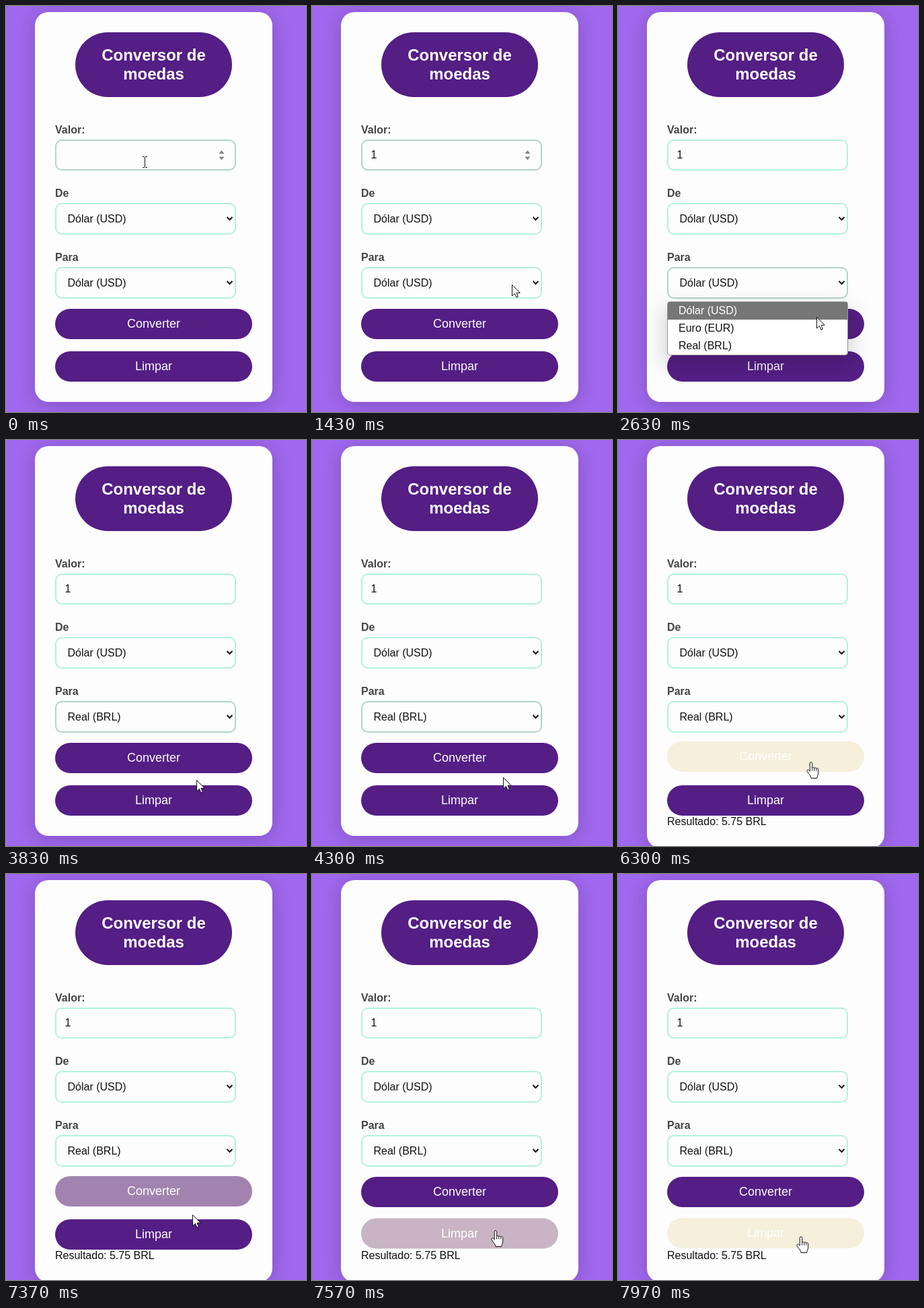
Write an HTML page that moves like this. It is 446 px wide and 602 px high and loops after 8000 ms.

```html
<!DOCTYPE html>
<html lang="pt-BR">
<head>
<meta charset="utf-8">
<title>Conversor de moedas</title>
<style>
  html, body { margin: 0; width: 100%; height: 100%; overflow: hidden; }
  body { position: relative; background: #a068ee; }
  #card {
    position: absolute; left: 43px; top: 9px; width: 353px; height: 578px;
    border-radius: 20px; background: #fdfdfd;
    box-shadow: 0 4px 30px rgba(0, 0, 0, .2);
  }
  svg { position: absolute; left: 0; top: 0; }
  text { font: 16px "Liberation Sans", Arial, sans-serif; fill: #111; white-space: pre; }
  .title { font-size: 24px; font-weight: bold; fill: #fff; text-anchor: middle; }
  .label { font-weight: bold; fill: #444; }
  .button text { font-size: 18px; fill: #fff; text-anchor: middle; }
  .plum { fill: #541e85; }
  .field { fill: #fdfdfd; stroke: #b3f1de; stroke-width: 2; }
  .field.focus { stroke: #b2d3cd; }
  .chevron { fill: none; stroke: #111; stroke-width: 2; }
  #glow { fill: #d6d6d6; filter: blur(14px); mix-blend-mode: multiply; }
  .pointer { fill: #fff; stroke: #111; stroke-linejoin: round; }
</style>
</head>
<body>
<div id="card"></div>
<svg width="446" height="602" viewBox="0 0 446 602">
  <rect class="plum" x="103" y="39" width="233" height="96" rx="48"/>
  <text class="title" x="219.5" y="81">Conversor de</text>
  <text class="title" x="219.5" y="109">moedas</text>

  <text class="label" x="73" y="189">Valor:</text>
  <rect class="field" id="amountBox" x="74" y="199" width="267" height="44" rx="9"/>
  <text id="amount" x="87.5" y="226">1</text>
  <path id="spinner" fill="#858585" d="M316.5 219l4-5 4 5zM316.5 223.5l4 5 4-5z"/>

  <text class="label" x="73" y="283">De</text>
  <rect class="field" x="74" y="293" width="267" height="45" rx="9"/>
  <text x="91.5" y="321">Dólar (USD)</text>
  <path class="chevron" d="M328.5 313l4 4 4-4"/>

  <text class="label" x="73" y="378">Para</text>
  <rect class="field" id="targetBox" x="74" y="388" width="267" height="45" rx="9"/>
  <text id="target" x="91.5" y="416">Dólar (USD)</text>
  <path class="chevron" d="M328.5 408l4 4 4-4"/>

  <text id="result" x="73" y="571">Resultado: 5.75 BRL</text>
  <g class="button" id="convert">
    <rect class="plum" x="73" y="449" width="293" height="45" rx="22.5"/>
    <text x="219.5" y="477">Converter</text>
  </g>
  <g class="button" id="clear">
    <rect class="plum" x="73" y="512" width="293" height="45" rx="22.5"/>
    <text x="219.5" y="540">Limpar</text>
  </g>

  <rect id="glow" x="68" y="446" width="279" height="86" rx="6"/>
  <g id="popup">
    <rect x="73.5" y="438.5" width="268" height="79" rx="4" fill="#fff" stroke="#999"/>
    <rect id="highlight" x="74" y="439" width="267" height="26" fill="#767676"/>
    <text x="90" y="457">Dólar (USD)</text>
    <text x="90" y="483">Euro (EUR)</text>
    <text x="90" y="509">Real (BRL)</text>
  </g>

  <g id="cursor">
    <path id="beam" fill="none" stroke="#111" d="M-3 -7.5h2.5l1 1 1-1H4M.5 -7V8M-3 8.5h2.5l1-1 1 1H4"/>
    <path id="arrow" class="pointer" d="M.5 .5V17L4.4 13.3 7 19 9.4 18 7 12.3H12.2Z"/>
    <path id="hand" class="pointer" d="M-1.7 13V1.5a1.7 1.7 0 0 1 3.4 0V8.5a1.6 1.6 0 0 1 3.1 .4 1.6 1.6 0 0 1 3.1 .6 1.5 1.5 0 0 1 2.8 1V16c0 3-1.9 4-1.9 7.5H0C0 20-3 18-5.8 13.5-7 11.5-4.6 10-3.2 11.6ZM1.7 8.5V12.5M4.8 9V12.5M7.9 9.5V12.5"/>
  </g>
</svg>
<script>
const LOOP = 8000;
const TIMES = { typed: 500, open: 1950, close: 3600, clicked: 4800, result: 6250 };
const HOVER_MS = 300;

// time, x, y of the pointer hotspot
const PATH = [
  [0, 206, 231], [850, 206, 231], [1350, 297, 413], [2100, 297, 413],
  [2500, 295, 461], [2750, 295, 461], [3250, 283, 504], [4250, 283, 504],
  [4600, 287, 478], [7180, 287, 478], [7370, 277, 505],
  [7650, 272, 538], [LOOP, 272, 538]
];
const FILL = [[84, 30, 133], [245, 239, 220]];

const $ = id => document.getElementById(id);
const clamp = v => Math.min(1, Math.max(0, v));
const lerp = (a, b, k) => a + (b - a) * k;
const easeOut = v => 1 - (1 - v) ** 2;
const show = (id, on) => $(id).setAttribute('visibility', on ? 'visible' : 'hidden');

function pointerAt(t) {
  const i = PATH.findIndex(p => p[0] > t);
  const [a, b] = [PATH[i - 1], PATH[i]];
  const k = (t - a[0]) / (b[0] - a[0]);
  return [lerp(a[1], b[1], k), lerp(a[2], b[2], k)];
}

function hover(t, enter, leave = Infinity) {
  return easeOut(clamp((t - enter) / HOVER_MS)) - easeOut(clamp((t - leave) / HOVER_MS));
}

function paintButton(id, k) {
  $(id).setAttribute('transform', `translate(0 ${-2 * k})`);
  $(id).firstElementChild.style.fill = `rgb(${FILL[0].map((c, n) => lerp(c, FILL[1][n], k))})`;
}

function draw(t) {
  const [x, y] = pointerAt(t);
  const open = t >= TIMES.open && t < TIMES.close;
  const done = t >= TIMES.result;
  const within = (top, bottom) => y >= top && y < bottom;

  show('amount', t >= TIMES.typed);
  show('spinner', t < TIMES.open);
  $('amountBox').classList.toggle('focus', t < TIMES.open);
  $('targetBox').classList.toggle('focus', t >= TIMES.open && t < TIMES.clicked);
  $('target').textContent = t < TIMES.close ? 'Dólar (USD)' : 'Real (BRL)';
  show('result', done);
  $('card').style.height = (done ? 596 : 578) + 'px';

  show('glow', open);
  show('popup', open);
  const row = Math.min(2, Math.max(0, Math.floor((y - 439) / 26)));
  $('highlight').setAttribute('y', 439 + 26 * row);
  document.querySelectorAll('#popup text').forEach((item, i) => {
    item.style.fill = i === row ? '#fff' : '#111';
  });

  paintButton('convert', hover(t, 4390, 7280));
  paintButton('clear', hover(t, 7430));

  const beam = within(198, 244);
  const hand = !open && (within(449, 494) || within(512, 557));
  show('beam', beam);
  show('hand', hand);
  show('arrow', !beam && !hand);
  $('cursor').setAttribute('transform', `translate(${Math.round(x)} ${Math.round(y)})`);
}

const start = performance.now();
function tick(now) {
  draw(Math.max(0, now - start) % LOOP);
  requestAnimationFrame(tick);
}
draw(0);
requestAnimationFrame(tick);
</script>
</body>
</html>
```
